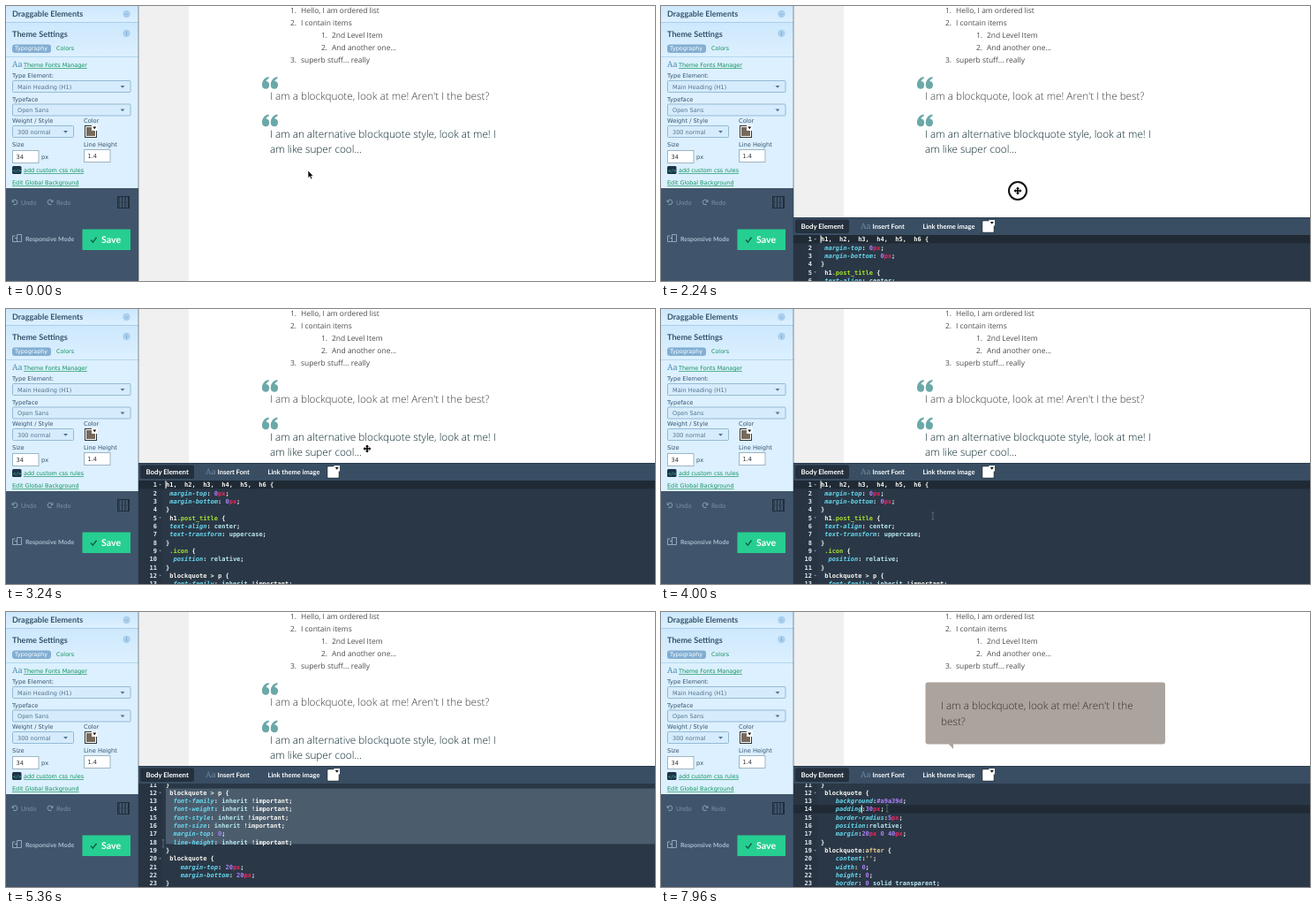
An HTML page for the animation above (8000 ms loop, 735 by 311 pixels).

```html
<!DOCTYPE html>
<html lang="en">
<head>
<meta charset="utf-8">
<title>Theme editor</title>
<style>
html, body { margin: 0; width: 100%; height: 100%; overflow: hidden; background: #fff; }
svg { display: block; width: 735px; height: 311px; }
text { white-space: pre; text-rendering: geometricPrecision; }
</style>
</head>
<body>
<svg id="stage" viewBox="0 0 735 311" xmlns="http://www.w3.org/2000/svg"></svg>
<script>
const LATO = "Lato, sans-serif", SANS = "'DejaVu Sans', sans-serif";
const OPEN = "'Open Sans', sans-serif", SERIF = "'Noto Serif', serif";
const MONO = "'DejaVu Sans Mono', monospace";
const LINE = 9.33, CHAR = 4.214, CODE_X = 181;

const text = (x, y, str, size, fill, font, extra = "") =>
  `<text x="${x}" y="${y}" font-size="${size}" fill="${fill}" font-family="${font}" ${extra}>${str}</text>`;
const rect = (x, y, w, h, fill, extra = "") =>
  `<rect x="${x}" y="${y}" width="${w}" height="${h}" fill="${fill}" ${extra}/>`;
const path = (d, fill, extra = "") => `<path d="${d}" fill="${fill}" ${extra}/>`;
const group = (id, body, extra = "") => `<g id="${id}" ${extra}>${body}</g>`;
const BOLD = 'font-weight="700"';

// ---------- page ----------
const item = (x, y, n, str) =>
  text(x - 12, y, n + ".", 8.45, "#4c4c4c", OPEN) + text(x, y, str, 8.45, "#4c4c4c", OPEN);

function quoteMark(y) {
  const half = x => path(`M${x + 7.6} ${y}C${x + 3} ${y + .8} ${x} ${y + 4.5} ${x} ${y + 9}
    a4.1 4.4 0 1 0 4.6 -4.1c.2 -1.5 1.4 -2.4 3.2 -3z`, "#6ba8a8");
  return half(290) + half(299.8);
}
const quoteLine = (x, y, str, fill) => text(x, y, str, 11.75, fill, OPEN, 'font-weight="300"');

function page() {
  return rect(150, 0, 57, 311, "#f0f0f0") + rect(207, 0, 528, 311, "#fff") +
    item(334, 8, 1, "Hello, I am ordered list") +
    item(334, 22, 2, "I contain items") +
    item(369, 36, 1, "2nd Level Item") +
    item(369, 50, 2, "And another one...") +
    item(334, 64.3, 3, "superb stuff... really") +
    group("plain",
      quoteMark(80) + quoteLine(299, 105.5, "I am a blockquote, look at me! Aren't I the best?", "#3c3835") +
      quoteMark(122.5) +
      quoteLine(299, 148.5, "I am an alternative blockquote style, look at me! I", "#04222a") +
      quoteLine(299, 166, "am like super cool...", "#04222a")) +
    group("styled",
      rect(299.5, 79.5, 271.5, 70, "#aba39d", 'rx="3"') +
      path("M325.5 149h5.5v6z", "#aba39d") +
      quoteLine(317, 110, "I am a blockquote, look at me! Aren't I the", "#3a3029") +
      quoteLine(317, 127.5, "best?", "#3a3029"));
}

// ---------- sidebar ----------
const INK = "#36536b", GREEN = "#0f915b";
const label = (x, y, str, fill = INK, size = 6.65) => text(x, y, str, size, fill, SANS);
const link = (x, y, str) => text(x, y, str, 6.45, GREEN, SANS, 'text-decoration="underline"');
const select = (y, w, str) =>
  rect(7.5, y + .5, w, 13, "#d6ecfd", 'stroke="#94b9d3" rx="1"') + label(13, y + 9.6, str, "#55748c", 6.55) +
  path(`M${w - 4} ${y + 6}h5l-2.5 2.7z`, "#4d7694");
const input = (x, y, str) =>
  rect(x + .5, y + .5, 29.5, 14, "#fff", 'stroke="#9fb4c4"') + label(x + 4.5, y + 10, str, "#333");
const toggle = (y, sign) =>
  `<circle cx="136.5" cy="${y}" r="4.2" fill="#a9cfee"/>` +
  text(136.5, y + 2, sign, 6, "#5f8bad", SANS, 'text-anchor="middle"');
const swatch = (x, y, fill) =>
  rect(x + .5, y + .5, 13, 13, fill, 'stroke="#2c333b"') + rect(x + 1.5, y + 1.5, 11, 11, "none", 'stroke="#fff"') +
  rect(x + 8, y - .5, 6.5, 6.5, "#fff") + path(`M${x + 9.3} ${y + 1.5}h4l-2 2.8z`, "#111");
const arc = (x, flip) => `<g transform="translate(${x} 222) scale(${flip} 1)">` +
  path("M-2.2 -1.6A2.7 2.7 0 1 1 -1.6 2", "none", 'stroke="#8398ad" stroke-width="1.1"') +
  path("M-3.4 -3.2v3.2h3.2z", "#8398ad") + "</g>";

function sidebar() {
  const bars = [128, 131.5, 135, 138.5].map(x => `M${x} 216v13`).join("");
  return rect(0, 0, 150, 206, "#dcf0ff") +
    rect(0, 0, 150, 18, "url(#head)") + rect(0, 18, 150, 1, "#a9cfea") +
    rect(0, 19, 150, 38, "url(#head)") + rect(0, 57, 150, 1, "#b4d6ee") +
    text(7, 12, "Draggable Elements", 9.05, INK, LATO, BOLD) + toggle(9, "–") +
    text(7, 35, "Theme Settings", 9.15, INK, LATO, BOLD) + toggle(31, "i") +
    rect(7, 43.5, 44, 9.5, "#82aed2", 'rx="3"') + label(10, 50.3, "Typography", "#fff", 6.4) +
    label(57, 50.3, "Colors", GREEN, 6.4) +
    text(7, 69.3, "Aa", 9.2, "#4f8db3", SERIF) + link(20, 69, "Theme Fonts Manager") +
    label(7, 81, "Type Element:") + select(84, 133.5, "Main Heading (H1)") +
    label(7, 107.8, "Typeface") + select(110.5, 133.5, "Open Sans") +
    label(7, 132, "Weight / Style") + select(135, 69, "300 normal") +
    label(88, 132, "Color") + swatch(89, 135, "#77695b") +
    label(7, 159, "Size") + input(7, 163, "34") + label(40, 172.5, "px") +
    label(88, 158.5, "Line Height") + input(88, 162, "1.4") +
    rect(7, 181, 10.5, 9, "#1c3448", 'rx="1.5"') + text(8, 187.8, "&lt;/&gt;", 5, "#42b7a4", MONO, BOLD) +
    link(20, 188, "add custom css rules") + link(7, 202, "Edit Global Background") +
    rect(0, 206, 150, 105, "#40556b") +
    arc(10, 1) + text(17, 224.8, "Undo", 7.3, "#7c91a6", LATO) +
    arc(50, -1) + text(57, 224.8, "Redo", 7.3, "#7c91a6", LATO) +
    rect(126.5, 215.5, 13, 13, "none", 'stroke="#1f2d3b"') +
    path(bars, "none", 'stroke="#1f2d3b"') + path("M127 222h13", "none", 'stroke="#2c3c4d" stroke-width=".6"') +
    path("M7.5 260v6.5h5M7.5 260h3M12.5 258.5h5v8h-5zM10 262.5h3", "none", 'stroke="#9bb0c4" stroke-width=".9"') +
    text(22, 265.5, "Responsive Mode", 7, "#a9bccd", LATO, BOLD) +
    rect(86.5, 252.5, 54.5, 23.5, "#26cf91") +
    path("M96 264.5l2.3 2.6l4.2 -5.4", "none", 'stroke="#0f5c48" stroke-width="1.4"') +
    text(108, 268, "Save", 10.6, "#fff", LATO, BOLD) +
    rect(149.5, 0, 1, 311, "#2b3a4a", 'opacity=".55"');
}

// ---------- code panel ----------
const inherit = ["font-family", "font-weight", "font-style", "font-size"].map(p => `  ${p}: inherit !important;`);
const shared = ["h1,  h2,  h3,  h4,  h5,  h6 {", " margin-top: 0px;", " margin-bottom: 0px;", "}",
  " h1.post_title {", " text-align: center;", " text-transform: uppercase;", "}",
  " .icon {", "  position: relative;", "}"];
const before = [" blockquote > p {", ...inherit, "  margin-top: 0;", "  line-height: inherit !important;", "}",
  " blockquote {", "    margin-top: 20px;", "    margin-bottom: 20px;", "}"];
const after = [" blockquote {", "    background:#a9a39d;", "    padding:30px;", "    border-radius:5px;",
  "    position:relative;", "    margin:20px 0 40px;", "}",
  " blockquote:after {", "    content:'';", "    width: 0;", "    height: 0;", "    border: 0 solid transparent;"];

const span = (str, fill, extra = "") => `<tspan fill="${fill}" ${extra}>${str}</tspan>`;

function valueColor(token) {
  if (token === "px") return "#f0285f";
  if (/^[#\d]/.test(token)) return "#ae81ff";
  if (token[0] === "'") return "#e6db74";
  return token[0] === "!" ? "#f8f8f2" : "#b9e8f2";
}
function highlight(line) {
  const rule = line.match(/^(\s*)([\w-]+)(:.*;)$/);
  if (!rule) return line.replace(/\.\w+|after/g, s => span(s, s === "after" ? "#e8cf95" : "#a6e22e")).replace(" > ", " &gt; ");
  return rule[1] + span(rule[2], "#66d9ef", 'font-style="italic"') +
    rule[3].replace(/!\w+|#\w+|\d+|px|'.*?'|[a-z]+/g, s => span(s, valueColor(s)));
}
function listing(lines, first) {
  return lines.map((line, i) => {
    const y = 27.2 + (first + i - 1) * LINE;
    return text(171, y, first + i, 7, "#e6ebf0", MONO, 'font-weight="700" text-anchor="end"') +
      (line.endsWith("{") ? path(`M173.2 ${y - 3.2}h2.8l-1.4 1.8z`, "#7d8b98") : "") +
      text(CODE_X, y, highlight(line), 7, "#f8f8f2", MONO, BOLD);
  }).join("");
}
function panel() {
  const code = group("scroller",
    rect(150, 0, 585, LINE, "#1f2a35", 'id="activeLine"') +
    rect(CODE_X, 20 + 11 * LINE, 554, 0, "#4b5c6d", 'id="selection"') +
    listing(shared, 1) + group("before", listing(before, 12)) + group("after", listing(after, 12)) +
    rect(0, 0, 1, LINE - .6, "#f8f8f0", 'id="caret"'));
  return rect(150, 0, 585, 311, "#2a3746") + rect(150, 20, 27, 300, "#283442") +
    group("codeArea", code, 'clip-path="url(#codeClip)"') +
    rect(150, 0, 585, 20, "#394e63") + rect(150, 0, 585, 1, "#2d3e50") +
    rect(152, 2.5, 61, 15.5, "#24303d", 'rx="2"') +
    text(158.5, 12.7, "Body Element", 7.8, "#fff", LATO, BOLD) +
    text(226, 13, "Aa", 9.2, "#6f879d", SERIF) +
    text(239.5, 12.7, "Insert Font", 7.5, "#fff", LATO, BOLD) +
    text(296.5, 12.7, "Link theme image", 7.5, "#fff", LATO, BOLD) + swatch(363.5, 3.5, "#fff");
}

// ---------- pointer ----------
const pointer =
  group("ring", '<circle r="10" fill="none" stroke="#fff" stroke-width="4" opacity=".55"/>' +
    '<circle r="10" fill="none" stroke="#111" stroke-width="2"/>') +
  group("arrow", path("M0 0v8.6l2 -1.8l1.5 3.2l1.5 -.7l-1.4 -3.1h2.6z", "#000", 'stroke="#fff" stroke-width=".7"')) +
  group("cross", path("M0 -4.5l2 2.2h-1.2v1.5h1.5v-1.2l2.2 2l-2.2 2v-1.2h-1.5v1.5h1.2l-2 2.2l-2 -2.2h1.2v-1.5h-1.5v1.2l-2.2 -2l2.2 -2v1.2h1.5v-1.5h-1.2z",
    "#000", 'stroke="#fff" stroke-width="1.2" paint-order="stroke"')) +
  group("beam", path("M-1.5 -4h3M0 -4v8M-1.5 4h3", "none", 'stroke="#66727e" stroke-width=".8"'));

document.getElementById("stage").innerHTML =
  `<defs><linearGradient id="head" x2="0" y2="1"><stop stop-color="#cde8fd"/><stop offset="1" stop-color="#dcf0ff"/></linearGradient>
  <clipPath id="codeClip">${rect(150, 20, 585, 291, "#000")}</clipPath></defs>` +
  page() + group("panel", panel()) + sidebar() + group("pointer", pointer);

// ---------- motion ----------
const $ = id => document.getElementById(id);
const show = (id, on) => $(id).setAttribute("display", on ? "inline" : "none");
const move = (id, x, y) => $(id).setAttribute("transform", `translate(${x} ${y})`);

// Eased value of a list of [time, ...values] keys.
function track(keys, t) {
  const next = keys.findIndex(k => k[0] > t);
  if (next < 0) return keys[keys.length - 1].slice(1);
  if (next === 0) return keys[0].slice(1);
  const a = keys[next - 1], b = keys[next], u = (t - a[0]) / (b[0] - a[0]), e = u * u * (3 - 2 * u);
  return a.slice(1).map((v, i) => v + (b[i + 1] - v) * e);
}
const pointerPath = [[0, 342, 186], [250, 342, 186], [1150, 48, 186], [1650, 48, 186], [2060, 404, 246],
  [2240, 404, 209], [2640, 404, 201], [2900, 404, 181], [3000, 404, 181], [3240, 409, 158], [3500, 409, 158],
  [4100, 300, 240], [4800, 178, 204], [5080, 178, 204], [5600, 178, 307], [6380, 178, 307], [6600, 256, 222]];
const panelTop = [[1740, 311], [1960, 239], [2240, 239], [2640, 194], [2900, 174]];
const scrollBy = [[4240, 0], [4780, 97]];
const selected = [[5080, 0], [5600, 12 * LINE]];

function draw(now) {
  const t = now % 8000;
  const [x, y] = track(pointerPath, t);
  move("pointer", x, y);
  show("arrow", t < 2060);
  show("cross", t >= 2060 && t < 3600);
  show("beam", t >= 3600);
  show("ring", (t >= 1350 && t < 1600) || (t >= 2060 && t < 2960));

  move("panel", 0, track(panelTop, t)[0]);
  move("scroller", 0, -track(scrollBy, t)[0]);

  const pasted = t >= 5960, editing = t >= 6600;
  show("before", !pasted);
  show("after", pasted);
  $("selection").setAttribute("height", pasted ? 0 : track(selected, t)[0]);
  const lineY = 20 + (editing ? 13 : 0) * LINE;
  $("activeLine").setAttribute("y", lineY);
  move("caret", CODE_X + (editing ? 11 : 0) * CHAR - .5, lineY + .3);

  show("plain", t < 7000);
  show("styled", t >= 7000);
  requestAnimationFrame(draw);
}
draw(performance.now());
</script>
</body>
</html>
```
